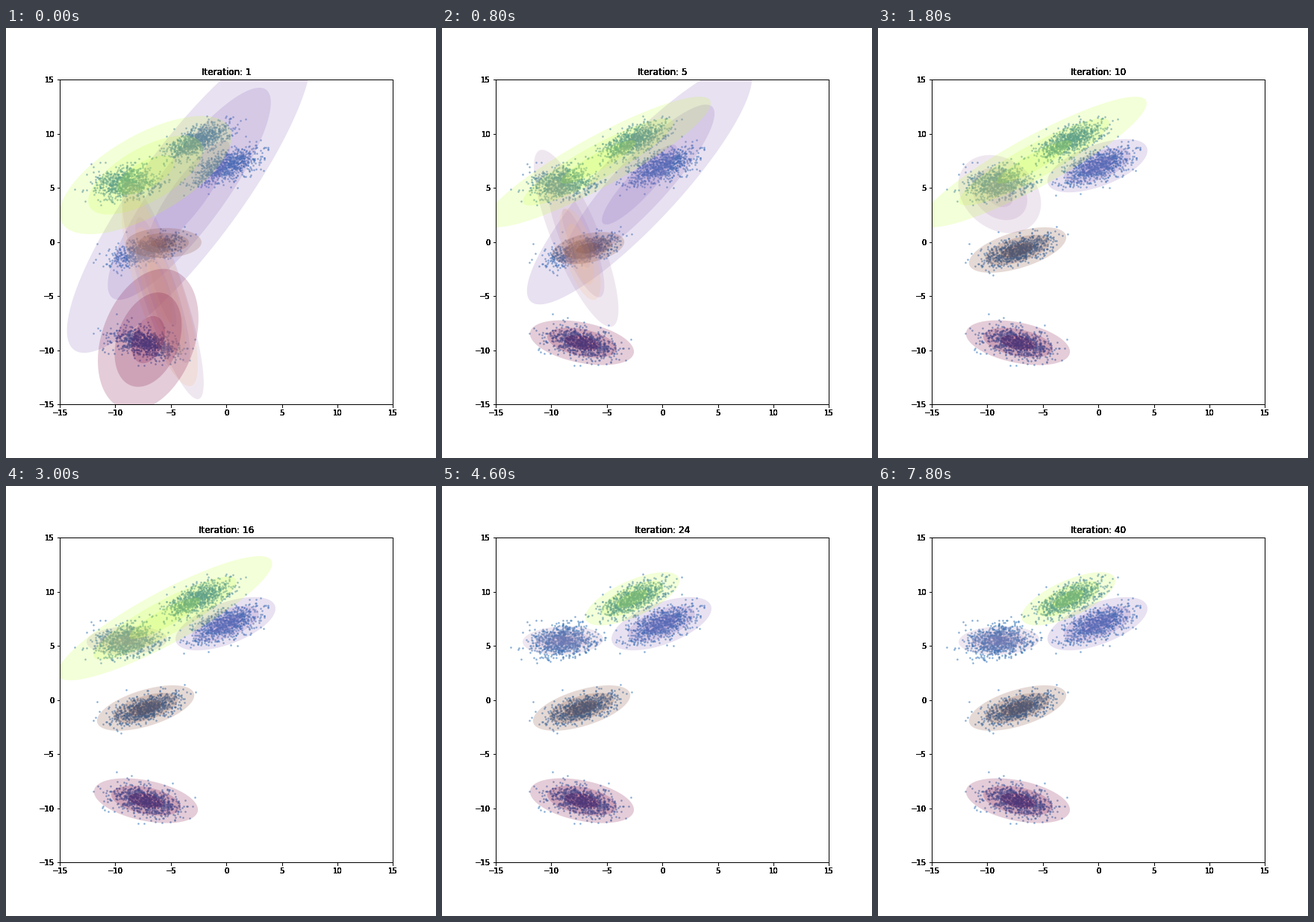
Recreate the animation shown at these times as a matplotlib script. Size 576 by 576 pixels, loop 8000 ms.

```python
import numpy as np
import matplotlib.pyplot as plt
from matplotlib.animation import FuncAnimation
from matplotlib.patches import Polygon

STEPS = 40
RECT = [0.125, 0.125, 0.775, 0.755]
TURN = np.linspace(0, 2 * np.pi, 120)

plt.rcParams.update({"font.family": "DejaVu Sans", "font.size": 10})
rng = np.random.default_rng(7)

# a pose is (mean x, mean y, deviation x, deviation y, correlation)
LEFT = (-8.88, 5.49, 1.46, 0.70, 0.1)
TOP = (-2.70, 9.35, 1.41, 0.82, 0.68)
RIGHT = (-0.08, 7.04, 1.50, 0.82, 0.57)
MIDDLE = (-7.27, -0.75, 1.46, 0.70, 0.56)
BOTTOM = (-7.24, -9.31, 1.56, 0.69, -0.4)


def place(pose, u, v):
    """Map standard coordinates u, v onto a pose."""
    mx, my, sx, sy, rho = pose
    return mx + sx * u, my + sy * (rho * u + np.sqrt(1 - rho**2) * v)


class Blob:
    """Mixture component drawn at one, two and three deviations.

    It glides from start to mid, waits there, then settles on end.
    """

    def __init__(self, ax, color, start, mid, end, arrive, leave, settle, power=1):
        self.poses = np.array([start, mid, end])
        self.times = arrive, leave, settle
        self.power = power
        self.rings = [
            ax.add_patch(Polygon(np.zeros((3, 2)), lw=0, alpha=0.2, zorder=2,
                                 color=np.array(color) / 255))
            for _ in range(3)
        ]

    def pose(self, step):
        start, mid, end = self.poses
        arrive, leave, settle = self.times
        if step <= leave:
            u = min((step - 1) / (arrive - 1), 1)
            return start + (mid - start) * u
        u = min((step - leave) / (settle - leave), 1) ** self.power
        return mid + (end - mid) * u

    def update(self, step):
        pose = self.pose(step)
        for k, ring in enumerate(self.rings, 1):
            ring.set_xy(np.column_stack(place(pose, k * np.cos(TURN), k * np.sin(TURN))))


fig = plt.figure(figsize=(8, 8), dpi=72, facecolor="white")

# stacked copies of the frame give the heavy, hard-edged text
layers = [fig.add_axes(RECT, label=str(k)) for k in range(8)]
for k, layer in enumerate(layers):
    layer.set(xlim=(-15, 15), ylim=(-15, 15))
    layer.set_xticks(range(-15, 16, 5))
    layer.set_yticks(range(-15, 16, 5))
    layer.patch.set_visible(k == 0)
ax = layers[0]

for center in (LEFT, TOP, RIGHT, MIDDLE, BOTTOM):
    x, y = place(center, *rng.standard_normal((2, 900)))
    ax.scatter(x, y, s=3, alpha=0.4, color="#2a6fb5", zorder=1)

blobs = [
    Blob(ax, (140, 105, 187),
         (-3.34, 4.45, 3.67, 4.90, 0.86), (-1.42, 5.73, 3.23, 3.09, 0.9), RIGHT,
         arrive=7, leave=7, settle=10),
    Blob(ax, (175, 135, 180),
         (-5.73, -4.45, 1.23, 3.36, -0.85), (-8.78, 2.73, 1.29, 2.41, -0.78),
         (-8.95, 5.49, 1.21, 0.44, 0.1),
         arrive=7, leave=7, settle=15, power=0.5),
    Blob(ax, (245, 190, 140),
         (-5.99, -4.52, 1.14, 2.94, -0.78), (-7.47, -1.28, 0.87, 1.98, -0.9),
         (-7.27, -0.75, 0, 0, 0),
         arrive=3, leave=3, settle=10),
    Blob(ax, (128, 68, 48),
         (-5.66, -0.10, 1.14, 0.46, 0.05), (-6.40, -0.48, 0.90, 0.39, 0.3), MIDDLE,
         arrive=3, leave=3, settle=9),
    Blob(ax, (120, 0, 60),
         (-7.04, -9.03, 1.51, 2.18, 0.3), BOTTOM, BOTTOM,
         arrive=3, leave=3, settle=4),
    Blob(ax, (198, 255, 62),
         (-7.27, 6.18, 2.58, 1.82, 0.65), (-5.79, 7.39, 3.38, 2.01, 0.9), TOP,
         arrive=4, leave=13, settle=23.5, power=2),
]


def draw(frame):
    step = frame + 1
    for blob in blobs:
        blob.update(step)
    for layer in layers:
        layer.set_title(f"Iteration: {step}")
    return []


anim = FuncAnimation(fig, draw, frames=STEPS, interval=200, repeat=True,
                     repeat_delay=0, init_func=lambda: draw(0))
plt.show()
```
